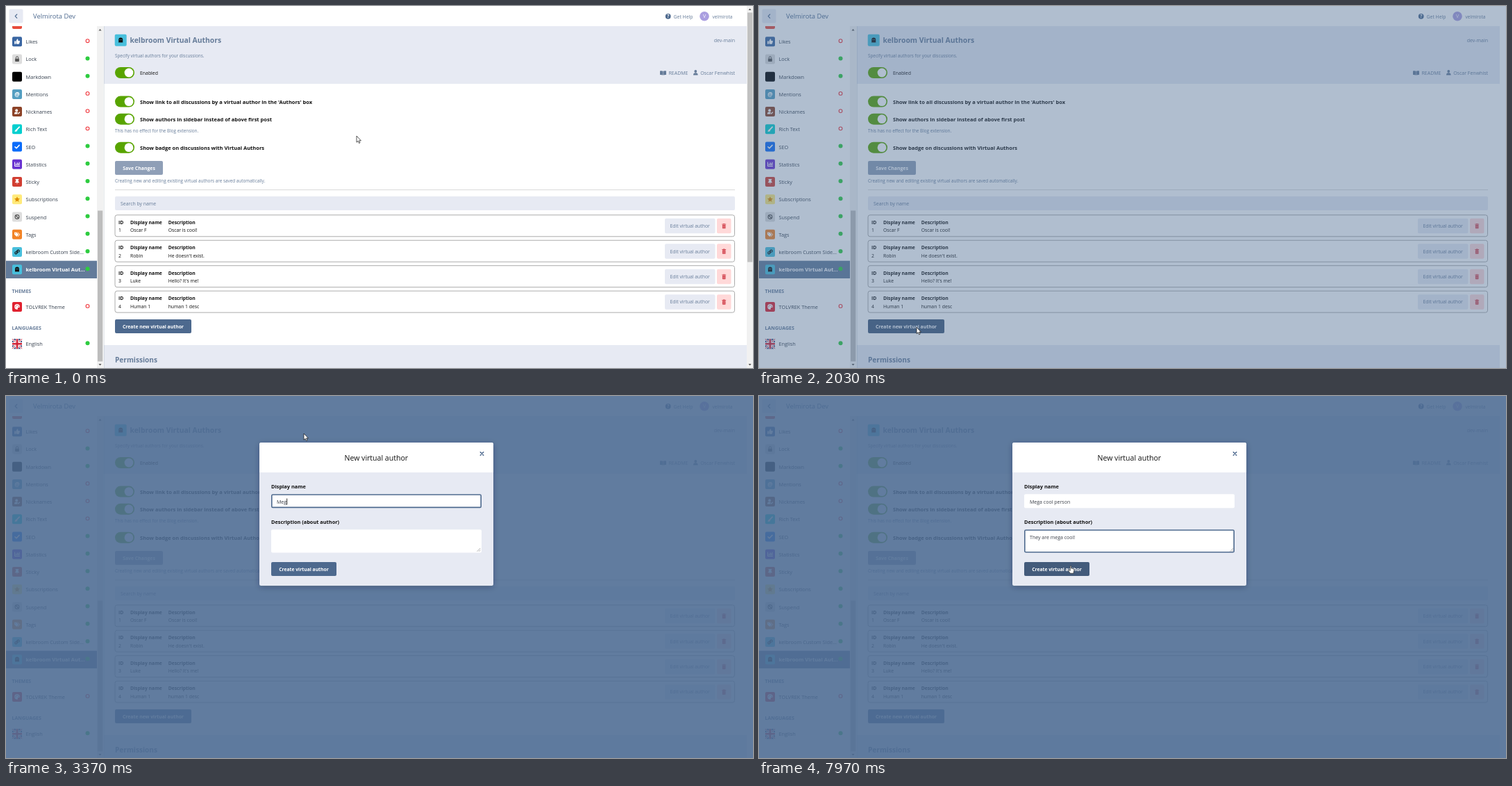
Recreate the animation shown at these times as an HTML page. Size 1076 by 521 pixels, loop 8000 ms.

```html
<!DOCTYPE html>
<html lang="en">
<head>
<meta charset="utf-8">
<title>Virtual authors</title>
<style>
html, body { margin: 0; width: 100%; height: 100%; overflow: hidden; background: #fff; }
svg { display: block; width: 1076px; height: 521px; }
text { font-family: "Open Sans", "Noto Sans", sans-serif; white-space: pre; }
</style>
</head>
<body>
<svg id="stage" viewBox="0 0 1076 521"></svg>
<script>
const MUTED = '#667c99', PRIMARY = '#4d698e', HOVER = '#435b7b', PANEL = '#e7eaf3', INK = '#111';

const rect = (x, y, w, h, fill, r = 0, extra = '') =>
  `<rect x="${x}" y="${y}" width="${w}" height="${h}" rx="${r}" fill="${fill}" ${extra}/>`;
const circle = (x, y, r, fill, extra = '') => `<circle cx="${x}" cy="${y}" r="${r}" fill="${fill}" ${extra}/>`;
const text = (x, y, str, size, fill = INK, extra = '') =>
  `<text x="${x}" y="${y}" font-size="${size}" fill="${fill}" ${extra}>${str}</text>`;
const path = (d, fill, extra = '') => `<path d="${d}" fill="${fill}" ${extra}/>`;
const at = (x, y, content) => `<g transform="translate(${x} ${y})">${content}</g>`;
const line = (d, color, width) =>
  path(d, 'none', `stroke="${color}" stroke-width="${width}" stroke-linecap="round" stroke-linejoin="round"`);
const BOLD = 'font-weight="700"', MIDDLE = 'text-anchor="middle"', END = 'text-anchor="end"';

// Icon glyphs, drawn around the origin
const glyphs = {
  none: () => '',
  thumb: c => path('M-3.8-.6h1.7V3.6h-1.7zM-1.5-.5L.2-3.9Q1.8-4 1.4-1.2H3.6Q4.4-.6 3.7.3 4 1.2 3.3 1.7 3.4 3.6 1.8 3.6H0L-1.5 3z', c),
  lock: c => rect(-2.9, -.7, 5.8, 4.2, c, .7) + line('M-1.7-.7V-2a1.7 1.7 0 0 1 3.4 0V-.7', c, 1),
  at: c => text(0, 2.7, '@', 8.5, c, BOLD + MIDDLE),
  user: c => circle(-.8, -1.9, 1.9, c) + path('M-4 3.5Q-4 .5-1.7.5H1L.3 3.5z', c) + line('M1.6 2.8L3.6.8', c, 1.3),
  brush: c => line('M3.2-3.2L-.3.5', c, 1.8) + path('M-1.3.2Q1.2 1.2 0 2.7-1.7 4.2-3.8 2.8-2.5 2.3-2.3 1-2 .2-1.3.2z', c),
  check: c => line('M-3 .2L-1 2.2 3.1-2.2', c, 1.6),
  chart: c => line('M-3.4-2.8V2.7H3.6M-1.5 1V-.4M.2 1V-2.2M1.7 1V-.9M3.1 1V-2.6', c, 1),
  pin: c => path('M-2.4-4h4.8v1.1H1.6L1.9-.6Q3 .1 3.1 1.2H.5L0 4.1-.5 1.2H-3.1Q-3-.1-1.9-.6L-1.6-2.9h-.8z', c),
  star: c => path('M0-4L1.2-1.4 4-1.1 1.9.8 2.5 3.6 0 2.2-2.5 3.6-1.9.8-4-1.1-1.2-1.4z', c),
  ban: c => circle(0, 0, 2.9, 'none', `stroke="${c}" stroke-width="1.1"`) + line('M-2-2L2 2', c, 1.1),
  tags: c => path('M-4-2.9H-.8L2.3.2-.7 3.3-4 0z', c) + line('M1-2.7L3.8.2 1.4 2.9', c, .9) + circle(-2.6, -1.5, .6, '#f28326'),
  link: c => line('M-.5.8A1.6 1.6 0 0 1-.5-1.2L1-2.7A1.5 1.5 0 0 1 3-.6L2.2.2M.5-.8A1.6 1.6 0 0 1 .5 1.2L-1 2.7A1.5 1.5 0 0 1-3 .6L-2.2-.2', c, 1.1),
  ghost: c => path('M-3 3.6V-.8a3 3 0 0 1 6 0V3.6L1.9 2.7 1 3.6 0 2.7-1 3.6-1.9 2.7z', c) +
    circle(-1.1, -.8, .6, '#48bfdc') + circle(1.1, -.8, .6, '#48bfdc'),
  palette: c => path('M0-3.9A3.9 3.9 0 1 0 .3 3.9Q1.4 3.5.8 2.4.4 1.2 2 1.2 3.9 1.4 3.9-.3A3.9 3.9 0 0 0 0-3.9z', c) +
    [[-2, 0], [-1, -2], [1, -2.1], [2.3, -.5]].map(([x, y]) => circle(x, y, .6, '#e0212f')).join(''),
  flag: () => rect(-7, -7, 14, 14, '#26356f', 1) +
    path('M-7-7L7 7M7-7L-7 7', 'none', 'stroke="#fff" stroke-width="2.8"') +
    path('M-7-7L7 7M7-7L-7 7', 'none', 'stroke="#d02035" stroke-width="1"') +
    path('M0-7V7M-7 0H7', 'none', 'stroke="#fff" stroke-width="4.4"') +
    path('M0-7V7M-7 0H7', 'none', 'stroke="#d02035" stroke-width="2.6"'),
  trash: c => rect(-2.3, -1.9, 4.6, 5.4, c, .6) + rect(-2.9, -3.2, 5.8, .9, c) + rect(-1, -3.8, 2, .8, c) +
    line('M-.9-.7V2.4M.9-.7V2.4', '#fdd', .4)
};
const icon = (x, y, bg, glyph, fg, size = 14) =>
  at(x, y, rect(-size / 2, -size / 2, size, size, bg, 2) + glyphs[glyph](fg));

const arrowUp = (x, y) => path(`M${x - 2} ${y + 1}h4l-2-2.4z`, '#555');
const arrowDown = (x, y) => path(`M${x - 2} ${y - 1}h4l-2 2.4z`, '#555');

function sideItem(y, label, enabled, bg, glyph, fg = '#fff', active = false) {
  return (active ? rect(0, y - 12.5, 131, 25.3, '#637b9a') : '') +
    icon(16, y, bg, glyph, fg) +
    text(28.5, y + 3, label, active ? 7.5 : 7.35, active ? '#fff' : '#36404e', active ? BOLD : '') +
    (enabled ? circle(117.5, y - 1, 3, '#2ecc40')
             : circle(117.5, y - 1, 2.4, '#fff', 'stroke="#f0383e" stroke-width="1.1"'));
}

function sidebar() {
  const items = [
    ['Likes', 0, '#3a66a2', 'thumb'], ['Lock', 1, '#ddd', 'lock', '#555'],
    ['Markdown', 1, '#000', 'none'], ['Mentions', 0, '#539ec1', 'at'],
    ['Nicknames', 0, '#8c4227', 'user'], ['Rich Text', 0, '#04cfcf', 'brush'],
    ['SEO', 1, '#0a6cfa', 'check'], ['Statistics', 1, '#6932d1', 'chart'],
    ['Sticky', 1, '#d13e32', 'pin'], ['Subscriptions', 1, '#ffea7b', 'star', '#de8e00'],
    ['Suspend', 1, '#ddd', 'ban', '#555'], ['Tags', 1, '#f28326', 'tags'],
    ['kelbroom Custom Side...', 1, '#48bfdc', 'link', INK],
    ['kelbroom Virtual Aut...', 1, '#48bfdc', 'ghost', INK, true]
  ];
  return rect(9, 19, 14, 14, '#e74c3c', 2) +
    items.map((item, i) => sideItem(51.2 + 25.23 * i, ...item)).join('') +
    text(8.5, 413, 'THEMES', 7, MUTED, BOLD) +
    sideItem(432.9, 'TOLVREK Theme', 0, '#e0212f', 'palette') +
    text(8.5, 466.3, 'LANGUAGES', 7, MUTED, BOLD) +
    sideItem(486.2, 'English', 1, '#26356f', 'flag') +
    rect(131, 29, 9.5, 492, '#f1f1f1') + rect(132, 294.5, 7.2, 217, '#bdbdbd') +
    arrowUp(135.5, 34.5) + arrowDown(135.5, 516);
}

function header() {
  return rect(0, 0, 1067, 29, '#fff') + rect(4.5, 4.5, 20, 20, PANEL, 2) +
    line('M15.8 12L13.2 14.7 15.8 17.4', PRIMARY, 1.1) +
    text(39, 17.9, 'Velmirota Dev', 9.4, PRIMARY) +
    circle(953.7, 14.8, 3.9, PRIMARY) + text(953.7, 17.2, '?', 6.5, '#fff', BOLD + MIDDLE) +
    text(961.5, 17.5, 'Get Help', 6.9, MUTED) +
    circle(1006, 14.7, 6.8, '#aa9ee0') + text(1006, 17.4, 'V', 7, '#fff', MIDDLE) +
    text(1017.5, 17.5, 'velmirota', 6.6, MUTED);
}

const toggle = (y, label, bold) =>
  rect(157, y - 8, 28, 16, '#58a400', 8) + circle(177, y, 6.4, '#fff') +
  text(193, y + 2.9, label, bold ? 7.5 : 6.9, INK, bold ? BOLD : '');

function card(i, name, description) {
  const y = 300.8 + 36.45 * i, top = y + 12.9, low = y + 24.4;
  return rect(157, y, 892.5, 31, '#fff', 3, 'stroke="#a3a3a3" stroke-width=".9"') +
    text(162, top, 'ID', 6.8, INK, BOLD) + text(179, top, 'Display name', 6.8, INK, BOLD) +
    text(233.7, top, 'Description', 6.8, INK, BOLD) +
    text(162, low, i + 1, 6.8) + text(179, low, name, 6.8) + text(233.7, low, description, 6.8) +
    rect(949, y + 5, 72.5, 21.5, PANEL, 2) + text(985.2, y + 18.3, 'Edit virtual author', 6.85, MUTED, MIDDLE) +
    rect(1024, y + 5, 20.5, 21.5, '#ffd9d9', 2) + at(1034.2, y + 16, glyphs.trash('#d2414c'));
}

function page() {
  return rect(141, 29, 926, 83, PANEL) + rect(141, 488, 926, 33, PANEL) +
    rect(140.5, 29, 1.5, 492, 'rgba(60,80,110,.12)') +
    icon(165.2, 49.3, '#48bfdc', 'ghost', INK, 17) +
    text(178.5, 53.2, 'kelbroom Virtual Authors', 10.35, MUTED, BOLD) +
    text(1050, 52.2, 'dev-main', 7, MUTED, END) +
    text(157, 74.2, 'Specify virtual authors for your discussions.', 6.35, MUTED) +
    toggle(96, 'Enabled') +
    path('M942 93.4Q944.5 92.8 946.3 93.8V99.5Q944 98.7 942 99zM951 93.4Q948.5 92.8 946.7 93.8V99.5Q949 98.7 951 99z', MUTED) +
    text(954.5, 99, 'README', 7, MUTED) +
    circle(993.3, 94, 1.9, MUTED) + path('M990 99.5Q990 96 993.3 96.2 996.6 96 996.6 99.5z', MUTED) +
    text(1050, 99, 'Oscar Fenwhist', 7, MUTED, END) +
    toggle(137.6, "Show link to all discussions by a virtual author in the 'Authors' box", true) +
    toggle(162.7, 'Show authors in sidebar instead of above first post', true) +
    text(157, 182.4, 'This has no effect for the Blog extension.', 6.35, MUTED) +
    toggle(203.7, 'Show badge on discussions with Virtual Authors', true) +
    rect(157, 223, 69, 20, '#8f9fb7', 2) + text(191.5, 235.9, 'Save Changes', 6.9, '#fff', BOLD + MIDDLE) +
    text(157, 253.6, 'Creating new and editing existing virtual authors are saved automatically.', 6.37, MUTED) +
    rect(157, 264.2, 893, .9, '#d5d5d5') +
    rect(157, 274, 893, 20, PANEL, 2) + text(165, 286.8, 'Search by name', 6.9, MUTED) +
    [['Oscar F', 'Oscar is cool!'], ['Robin', "He doesn't exist."], ['Luke', "Hello? It's me!"], ['Human 1', 'human 1 desc']]
      .map((row, i) => card(i, ...row)).join('') +
    rect(157, 451, 110, 20, PRIMARY, 2, 'id="newButton"') +
    text(212, 463.9, 'Create new virtual author', 6.82, '#fff', BOLD + MIDDLE) +
    text(157, 513.2, 'Permissions', 10.1, MUTED, BOLD);
}

const pageScrollbar = () => '<g id="scrollbar">' + rect(1067, 0, 9, 521, '#f1f1f1') +
  rect(1068, 9.5, 7.2, 359, '#c1c1c1') + arrowUp(1071.5, 5) + arrowDown(1071.5, 516) + '</g>';

const field = (id, y, h) => rect(382, y, 303, h, '#fff', 2) +
  rect(382.8, y + .8, 301.4, h - 1.6, 'none', 1.5, `id="${id}Ring" stroke="${PRIMARY}" stroke-width="1.6"`) +
  text(390, y + 13.4, '', 7.03, '#3a3f48', `id="${id}"`);

function modal() {
  return '<g id="modal">' + rect(365, 69, 337, 206, 'rgba(20,35,60,.3)', 3, 'filter="url(#soft)"') +
    rect(365, 67, 337, 206, PANEL, 2.5) + path('M365 110V69.5Q365 67 367.5 67H699.5Q702 67 702 69.5V110z', '#fff') +
    text(533.3, 92.9, 'New virtual author', 10.55, INK, MIDDLE) +
    line('M683.3 80.8L687.7 85.2M687.7 80.8L683.3 85.2', PRIMARY, 1.6) +
    text(382, 132.9, 'Display name', 7.4, INK, BOLD) + field('name', 141.2, 20) +
    text(382, 184, 'Description (about author)', 7.36, INK, BOLD) + field('about', 192.2, 33.3) +
    line('M678.8 223.5L683 219.3M681.3 223.5L683 221.8', '#777', .6) +
    rect(382, 239, 94, 20, PRIMARY, 2, 'id="createButton"') +
    text(429, 251.8, 'Create virtual author', 6.77, '#fff', BOLD + MIDDLE) +
    rect(0, 0, .8, 9, '#000', 0, 'id="caret"') + '</g>';
}

const pointers = '<g id="pointer">' +
  path('M0 0V9.2L2.1 7.3 3.5 10.5 5 9.8 3.6 6.8H6.4z', '#fff', 'id="arrow" stroke="#111" stroke-width=".7"') +
  path('M-.8.8Q0-.4.8.8V4L4.2 5Q5 5.4 4.8 6.8L4 11.2H-.6L-3.6 7.2Q-3.4 5.8-2 6.6L-.8 7.6z', '#fff', 'id="hand" stroke="#111" stroke-width=".6"') +
  `<g id="beam">${line('M-1.5-4.5H1.5M0-4.5V4.5M-1.5 4.5H1.5', INK, .8)}</g></g>`;

const $ = id => document.getElementById(id);
const show = (id, on) => $(id).setAttribute('visibility', on ? 'visible' : 'hidden');
const set = (id, attr, value) => $(id).setAttribute(attr, value);

$('stage').innerHTML = '<defs><filter id="soft" x="-10%" y="-10%" width="120%" height="125%"><feGaussianBlur stdDeviation="4"/></filter></defs>' +
  rect(0, 0, 1076, 521, '#fff') + page() + sidebar() + header() + pageScrollbar() +
  rect(0, 0, 1076, 521, 'rgb(78,108,148)', 0, 'id="backdrop"') + modal() + pointers;

const LOOP = 8000;
const ramp = (t, from, to) => Math.min(1, Math.max(0, (t - from) / (to - from)));
const linear = p => p, smooth = p => p * p * (3 - 2 * p), easeOut = p => 1 - (1 - p) ** 3;

// time, x, y, easing towards this point
const route = [
  [530, 505, 187], [1330, 206, 473, smooth], [1970, 216, 465, smooth], [2030, 226, 463, linear],
  [2100, 297, 422, linear], [2870, 429, 54, easeOut], [7600, 429, 54, linear], [7970, 449, 244, smooth]
];
const nameKeys = [3130, 3270, 3370, 3470, 3530, 3670, 3730, 3870, 3970, 4060, 4130, 4230, 4400, 4530, 4630, 4730];
const aboutKeys = [5270, 5370, 5470, 5530, 5630, 5770, 5830, 5900, 5970, 6130, 6230, 6330, 6430, 6530, 6630, 6730, 6830, 6970, 7130];
const FOCUS_NAME = 2370, FOCUS_ABOUT = 4870;

function pointerAt(t) {
  let [, x, y] = route[0];
  for (let i = 1; i < route.length && t > route[i - 1][0]; i++) {
    const [from, x0, y0] = route[i - 1], [to, x1, y1, ease] = route[i];
    const p = ease(ramp(t, from, to));
    x = x0 + (x1 - x0) * p;
    y = y0 + (y1 - y0) * p;
  }
  return [x, y];
}

const typed = (str, keys, t) => str.slice(0, keys.filter(k => k <= t).length);

function render(t) {
  const [x, y] = pointerAt(t);
  const inside = (left, top, right, bottom) => x >= left && x <= right && y >= top && y <= bottom;

  show('scrollbar', t < 1940);
  set('backdrop', 'opacity', t < 2000 ? 0 : .89 * ramp(t, 1950, 2113));
  set('newButton', 'fill', t < 2060 && inside(157, 451, 267, 474) ? HOVER : PRIMARY);

  const scale = .9 + .1 * easeOut(ramp(t, 2170, 2450));
  set('modal', 'opacity', ramp(t, 2170, 2320));
  set('modal', 'transform', `translate(533.5 170) scale(${scale}) translate(-533.5 -170)`);
  $('name').textContent = typed('Mega cool person', nameKeys, t);
  $('about').textContent = typed('They are mega cool!', aboutKeys, t);
  const moved = ramp(t, FOCUS_ABOUT, FOCUS_ABOUT + 100);
  set('nameRing', 'opacity', ramp(t, FOCUS_NAME, FOCUS_NAME + 100) - moved);
  set('aboutRing', 'opacity', moved);

  // The blink restarts with every key
  const lastEvent = Math.max(...[FOCUS_NAME, FOCUS_ABOUT, ...nameKeys, ...aboutKeys].filter(k => k <= t));
  const active = t < FOCUS_ABOUT ? 'name' : 'about';
  show('caret', t >= FOCUS_NAME && (t - lastEvent) % 1000 < 500);
  set('caret', 'x', 390.2 + $(active).getComputedTextLength());
  set('caret', 'y', active === 'name' ? 147.5 : 198.5);

  const onCreate = t > 7600 && inside(382, 239, 476, 259);
  const onField = t > 7600 && (inside(382, 141, 685, 161) || inside(382, 192, 685, 225));
  set('createButton', 'fill', onCreate ? HOVER : PRIMARY);
  set('pointer', 'transform', `translate(${x} ${y})`);
  show('hand', onCreate);
  show('beam', onField);
  show('arrow', !onCreate && !onField);
}

function tick() {
  render(performance.now() % LOOP);
  requestAnimationFrame(tick);
}
tick();
</script>
</body>
</html>
```
